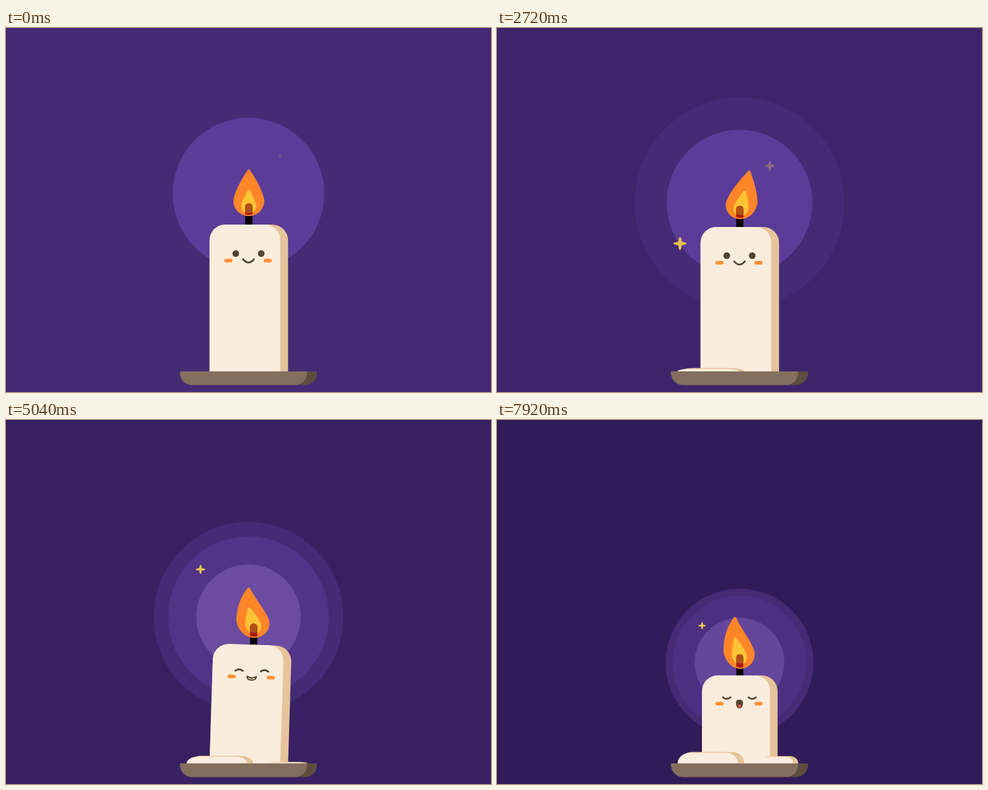
Animation of 800 by 600 pixels, one loop 8 s. Source, as an HTML page with a canvas:

```html
<!DOCTYPE html>
<html lang="en">
<head>
<meta charset="utf-8">
<title>Candle</title>
<style>
  html, body { margin: 0; width: 100%; height: 100%; overflow: hidden; background: #452a75; }
  canvas { display: block; width: 800px; height: 600px; }
</style>
</head>
<body>
<canvas id="stage" width="800" height="600"></canvas>
<script>
const ctx = document.getElementById('stage').getContext('2d');
const LOOP = 8000, STEP = 80, TAU = Math.PI * 2;
const CX = 400.5, BASE = 566;
const WAX = '#faeddd', SHADE = '#e6c49c', INK = '#54432f', BLUSH = '#ff8f35';

const lerp = (a, b, k) => a + (b - a) * k;
const clamp = v => Math.max(0, Math.min(1, v));
const mix = (a, b, k) => `rgb(${a.map((v, i) => Math.round(lerp(v, b[i], k))).join()})`;

// Smooth value through a flat list of time, value pairs.
function track(t, keys) {
  for (let i = 2; i < keys.length; i += 2) {
    if (t <= keys[i]) {
      const k = clamp((t - keys[i - 2]) / (keys[i] - keys[i - 2]));
      return lerp(keys[i - 1], keys[i + 1], k * k * (3 - 2 * k));
    }
  }
  return keys[keys.length - 1];
}

function fill(path, color) {
  ctx.fillStyle = color;
  ctx.fill(path);
}

function line(path, width) {
  ctx.strokeStyle = INK;
  ctx.lineWidth = width;
  ctx.stroke(path);
}

function disc(x, y, r, color) {
  const p = new Path2D();
  p.arc(x, y, r, 0, TAU);
  fill(p, color);
}

function box(x, y, w, h, r, color) {
  const p = new Path2D();
  p.roundRect(x, y, w, h, r);
  fill(p, color);
}

// Glow and sparkles, sharing one shrinking group
const sparkPath = new Path2D(
  'M0-1C.2-1 .22-.5 .28-.28C.5-.22 1-.2 1 0C1 .2 .5 .22 .28 .28' +
  'C.22 .5 .2 1 0 1C-.2 1-.22 .5-.28 .28C-.5 .22-1 .2-1 0C-1-.2-.5-.22-.28-.28C-.22-.5-.2-1 0-1Z');

const sparks = [
  { x: 52, y: -63, size: 18.8, start: -100, life: 840, every: 2040 },
  { x: 92, y: 47, size: 14.2, start: 780, life: 880, every: 2400 },
  { x: -102, y: 70, size: 11.5, start: 2300, life: 800, every: 3200 },
  { x: -155, y: 7.5, size: 10.5, start: 200, life: 400, every: 3280 },
  { x: -91, y: -90, size: 9, start: 1820, life: 640, every: 2880 }
];

function drawSpark(s, t) {
  const age = (((t - s.start) % s.every + s.every) % s.every) / s.life;
  if (age >= 1) return;
  const k = Math.min(1, age / 0.54, (1 - age) / 0.16);
  ctx.save();
  ctx.translate(s.x, s.y);
  ctx.scale(s.size * k, s.size * k);
  ctx.globalAlpha = k * (0.6 + 0.4 * k);
  fill(sparkPath, '#ecc750');
  ctx.restore();
}

function drawGlow(t, melt) {
  const beat = t % 680;
  const k = beat < 285 ? 1 - beat / 285 : (beat - 285) / 395;
  ctx.save();
  ctx.translate(400, 273 + 127 * melt);
  const s = (180 - 58 * melt) / 180;
  ctx.scale(s, s);
  disc(0, 0, 180, '#452a75');
  disc(0, 0, lerp(152, 180, k), mix([81, 51, 136], [69, 42, 117], k));
  disc(0, 0, lerp(98.7, 125, k), mix([107, 76, 161], [91, 60, 152], k));
  for (const spark of sparks) drawSpark(spark, t);
  ctx.restore();
}

// Flame: a teardrop bent along a swaying centre line
function sway(u, t, bend) {
  const a = TAU * t / 960;
  const tip = 13.5 * u ** 5.5;
  const belly = (25 * u * u - 16 * u ** 4) * bend;
  return clamp(t / 400) * (1 + tip * Math.cos(a) - belly * Math.sin(a));
}

function teardrop(x, bottom, height, half, t, total, lift, bend) {
  const N = 28, belly = 0.32, p = new Path2D();
  for (let i = 0; i <= 2 * N; i++) {
    const side = i <= N ? 1 : -1;
    const k = (i <= N ? i : 2 * N - i) / N;
    const u = k < 0.5 ? belly * (1 - Math.cos(Math.PI * k)) : belly + (1 - belly) * (2 * k - 1);
    const w = u < belly
      ? Math.sqrt(1 - (1 - u / belly) ** 2)
      : 1 - ((u - belly) / (1 - belly)) ** 1.42;
    const y = u * height;
    p.lineTo(x + side * half * w + sway((y + lift) / total, t, bend), bottom - y);
  }
  p.closePath();
  return p;
}

function drawTear(p, color) {
  ctx.strokeStyle = color;
  ctx.lineWidth = 4;
  fill(p, color);
  ctx.stroke(p);
}

function fillInside(clip, path, color) {
  ctx.save();
  ctx.clip(clip);
  fill(path, color);
  ctx.restore();
}

function drawFlame(t, x, top, sx) {
  const tall = track(t, [0, 77, 1280, 80, 2720, 80, 3680, 74, 5040, 83, 6720, 81.5, 7920, 85.5]);
  const half = track(t, [0, 25.5, 1280, 26, 2720, 26, 3680, 24, 5040, 27, 6720, 25.5]);
  const foot = top - track(t, [0, 14, 1280, 13, 3680, 13, 5040, 11.5, 6720, 12.5, 7920, 11]);
  const gap = track(t, [0, 3, 1280, 4.5, 3680, 4.5, 5040, 6.5, 7920, 6.5]);
  const outer = teardrop(x, foot - 2, tall - 4, half - 2, t, tall - 4, 0, 1);
  const inner = teardrop(x, foot - gap - 2, tall * 0.51 - 2.5, half * 0.48 - 2, t, tall - 4, gap, 1.25);

  const wick = new Path2D(), w = 12 * Math.min(1, sx);
  wick.roundRect(x - w / 2, top - 35, w, 40, [5.5, 5.5, 0, 0]);
  fill(wick, '#0a0305');
  drawTear(outer, '#ff8529');
  drawTear(inner, '#ffc435');
  fillInside(outer, wick, '#a9190e');
  fillInside(inner, wick, '#b05217');
}

// Face, around the level of the cheeks
const smile = new Path2D('M-9-2.3Q0 8.3 9-2.3');
const laugh = new Path2D('M-9.2-3H9.2Q10.5-3 10.4-1.5C9.5 5 5 8.5 0 8.5S-9.5 5-10.4-1.5Q-10.5-3-9.2-3Z');
const grin = new Path2D('M-7.7-1Q0 2-0 2T7.7-1C7.5 3 4.5 5 0 5S-7.5 3-7.7-1Z');
const yawn = new Path2D('M0-6.5C4-6.5 5.8-4.5 5.8-1.5C5.8 4 4 8 0 8S-5.8 4-5.8-1.5C-5.8-4.5-4-6.5 0-6.5Z');

function moodAt(t) {
  if (t >= 7280) return 'yawn';
  if (t >= 800 && t < 2160) return t < 880 || t >= 2080 ? 'grin' : 'laugh';
  if (t >= 4480 && t < 5200) return t < 4560 || t >= 4960 ? 'grin' : 'laugh';
  return 'calm';
}

function drawFace(mood) {
  ctx.lineCap = 'round';
  for (const x of [-33, 31.5]) box(x - 6.7, -3, 13.4, 6, 3, BLUSH);
  for (const x of [-21, 21]) {
    if (mood === 'calm') {
      disc(x, -11.7, 5.5, INK);
      continue;
    }
    const lid = new Path2D();
    const [end, mid] = mood === 'yawn' ? [-10.3, -5.2] : [-9.7, -14.7];
    lid.moveTo(x - 6.2, end);
    lid.quadraticCurveTo(x, mid, x + 6.2, end);
    line(lid, 2.9);
  }
  if (mood === 'calm') line(smile, 2.9);
  if (mood === 'grin') line(grin, 2.1);
  if (mood === 'laugh' || mood === 'yawn') {
    const mouth = mood === 'laugh' ? laugh : yawn;
    const tongue = new Path2D();
    if (mood === 'laugh') tongue.ellipse(0, 6, 4.5, 2.2, 0, 0, TAU);
    else tongue.ellipse(0, 4.2, 3, 2.7, 0, 0, TAU);
    fill(mouth, INK);
    fillInside(mouth, tongue, '#e0523e');
  }
}

function drawCandle(t, melt) {
  const stretch = track(t, [0, 0, 1280, 0, 2720, 11, 3680, 11, 5040, 5, 6720, 14, 7920, 30]);
  const h = 242 - 127 * melt + stretch;
  const glee = track(t, [640, 0, 1280, 1, 2160, 0]);
  const tilt = track(t, [4400, 0, 5040, 1, 5360, 0]);
  const sx = 1 + 0.05 * glee - 0.038 * track(t, [7120, 0, 7920, 1]);
  const rot = 0.0314 * tilt, skew = 0.028 * glee;

  const topX = CX + h * (Math.sin(rot) + skew);
  drawFlame(t, topX + 1.9 * Math.max(glee, tilt), BASE - h * Math.cos(rot), sx);

  ctx.save();
  ctx.translate(CX, BASE);
  ctx.rotate(rot);
  ctx.transform(1, 0, -skew, 1, 0, 0);
  const left = -64.75 * sx;
  box(left, -h, 129.5 * sx, h + 8, [26, 26, 0, 0], SHADE);
  box(left, -h, 116.5 * sx, h + 8, [26, 25, 0, 0], WAX);
  ctx.translate(-0.5 + 6.5 * glee + 0.7 * tilt, 59.5 - 0.135 * (242 - h) - h);
  drawFace(moodAt(t));
  ctx.restore();
}

// Melted wax and dish
function mound(x0, x1, h, rx, color) {
  if (h <= 0) return;
  const p = new Path2D(), y = BASE - h;
  p.moveTo(x0, BASE + 2);
  p.lineTo(x0, BASE);
  p.ellipse(x0 + rx, BASE, rx, h, 0, Math.PI, Math.PI * 1.5);
  p.lineTo(x1 - rx, y);
  p.ellipse(x1 - rx, BASE, rx, h, 0, -Math.PI / 2, 0);
  p.lineTo(x1, BASE + 2);
  fill(p, color);
}

function drawPuddle(x0, xLight, xEnd, h, rx) {
  mound(x0 + 4, xEnd, h, rx, SHADE);
  mound(x0, xLight, h - 1.3, rx, WAX);
}

function drawDish() {
  box(287, BASE, 226, 22.5, [0, 0, 20, 20], '#5e4e40');
  box(287, BASE, 209.5, 22.5, [0, 0, 20, 20], '#846f5e');
}

function draw(t) {
  const melt = (t / 7920) ** 2;
  ctx.lineJoin = 'round';
  ctx.fillStyle = mix([69, 42, 117], [48, 28, 88], t / 7920);
  ctx.fillRect(0, 0, 800, 600);
  drawGlow(t, melt);
  drawCandle(t, melt);
  const pool = t < 5040 ? (t - 960) * 0.00308 : lerp(12.5, 18.7, 1 - (1 - (t - 5040) / 2960) ** 2);
  drawPuddle(298, 397.5, 408, pool, 20);
  drawPuddle(430, 489, 497, track(t, [4640, 0, 5040, 2.5, 6720, 9, 7920, 12]), 14);
  drawDish();
}

const begin = performance.now();
function tick() {
  const t = (performance.now() - begin) % LOOP;
  draw(Math.floor(t / STEP) * STEP);
  requestAnimationFrame(tick);
}
tick();
</script>
</body>
</html>
```
